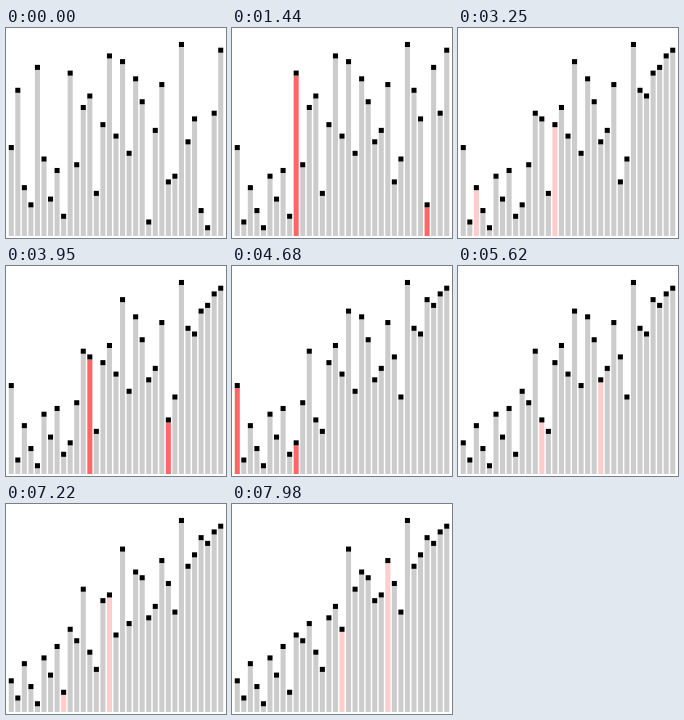
Animation of 220x210 px, one loop 8000 ms. Source, as a matplotlib script:

```python
import numpy as np
import matplotlib.pyplot as plt
from matplotlib.animation import FuncAnimation
from matplotlib.collections import PolyCollection

W, H = 220, 210
LOOP, TICK = 8000, 10
COMPARE_MS, SWAP_MS = 70, 120
GREY, PINK, RED = "#cccccc", "#ffcccc", "#ff6666"

START = [14, 24, 7, 4, 28, 12, 5, 10, 2, 27, 11, 21, 23, 6, 18, 30, 16,
         29, 13, 26, 22, 1, 17, 25, 8, 9, 32, 15, 19, 3, 0, 20, 31]
N = len(START)

MARGIN, BASE = 2, 208
CELL = (W - 2 * MARGIN) / N
PAD = 0.75
BAR = CELL - 2 * PAD
RISE = 189 / N
LEFT = MARGIN + PAD + CELL * np.arange(N)


def comb_sort(values):
    """Yield (values, compared pair, colour, duration) for each step."""
    a = list(values)
    yield a[:], (), GREY, COMPARE_MS
    gap = N
    while gap > 1:
        gap = int(gap * 0.8)
        for i in range(N - gap):
            j = i + gap
            swap = a[i] > a[j]
            yield a[:], (i, j), RED if swap else PINK, SWAP_MS if swap else COMPARE_MS
            if swap:
                a[i], a[j] = a[j], a[i]


def boxes(top, bottom):
    right = LEFT + BAR
    return np.stack([np.column_stack(p) for p in
                     ((LEFT, top), (right, top), (right, bottom), (LEFT, bottom))], axis=1)


steps, starts, clock = [], [], 0
for step in comb_sort(START):
    if clock >= LOOP:
        break
    steps.append(step)
    starts.append(clock)
    clock += step[3]

fig = plt.figure(figsize=(W / 100, H / 100), dpi=100, facecolor="white")
ax = fig.add_axes([0, 0, 1, 1])
ax.set_xlim(0, W)
ax.set_ylim(H, 0)
ax.axis("off")

style = dict(linewidths=0, edgecolors="none", antialiaseds=True, snap=False)
bars = ax.add_collection(PolyCollection([], **style), autolim=False)
caps = ax.add_collection(PolyCollection([], facecolors="black", **style), autolim=False)


def draw(frame):
    k = np.searchsorted(starts, frame * TICK, side="right") - 1
    values, pair, colour, _ = steps[k]
    top = BASE - RISE * (np.array(values) + 1)
    bars.set_verts(boxes(top, np.full(N, BASE)))
    bars.set_facecolor([colour if i in pair else GREY for i in range(N)])
    caps.set_verts(boxes(top - BAR, top))
    return bars, caps


anim = FuncAnimation(fig, draw, frames=LOOP // TICK, interval=TICK,
                     init_func=lambda: draw(0), repeat=True, repeat_delay=0)
plt.show()
```
